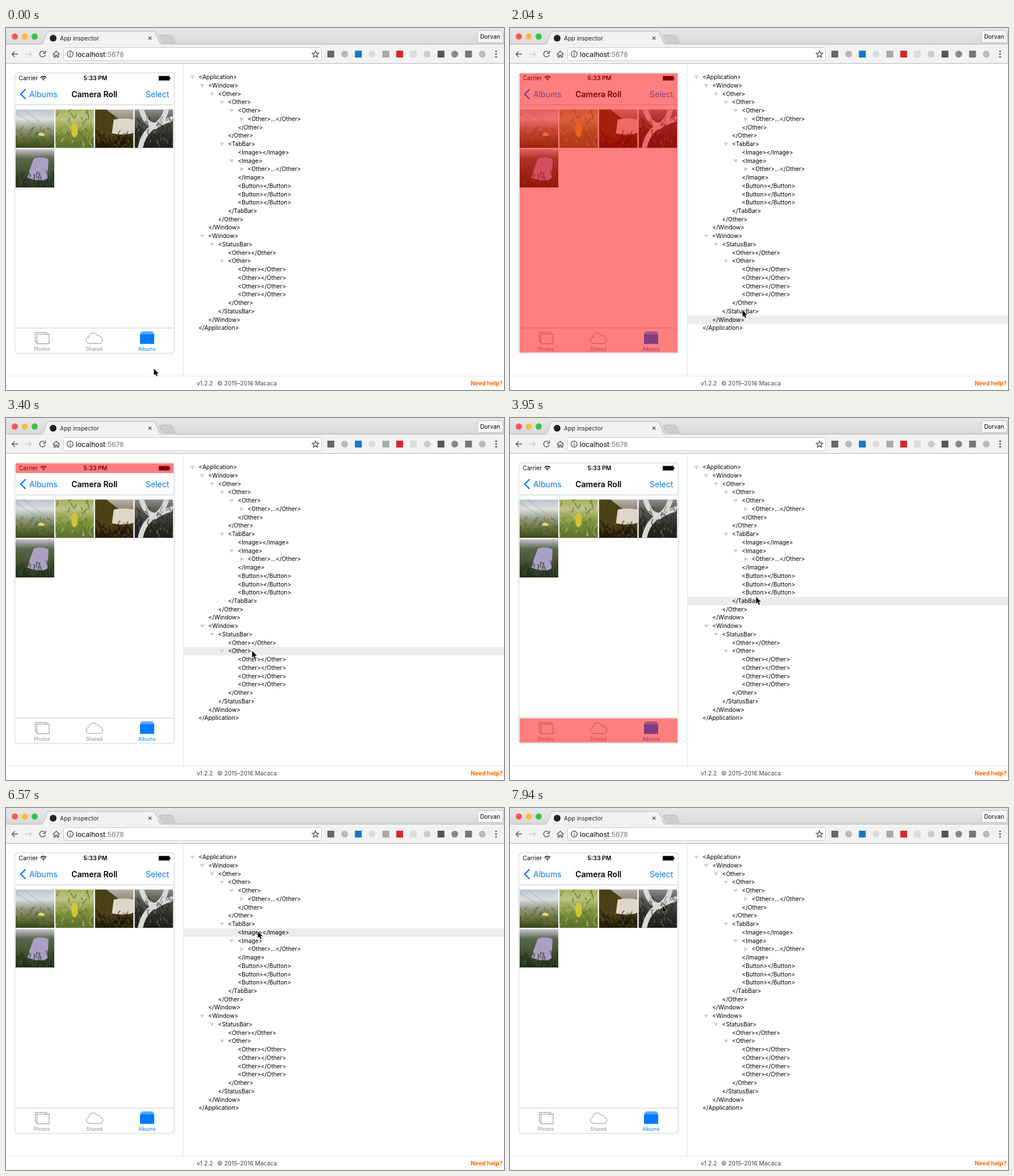
Write an HTML page that moves like this. It is 877 px wide and 638 px high and loops after 8000 ms.

```html
<!DOCTYPE html>
<html lang="en">
<head>
<meta charset="utf-8">
<title>App inspector</title>
<style>
  html, body { margin: 0; width: 877px; height: 638px; overflow: hidden; background: #fff; }
  svg { display: block; font: 10.25px Inter, "Open Sans", sans-serif; }
  .line { fill: none; stroke: #555; stroke-width: 1.4; }
  .thin { fill: none; stroke: #8e8e8e; }
  .blue, .tab.blue { fill: #007aff; }
  .nav { font-size: 14px; }
  .tab { font-size: 8.7px; text-anchor: middle; fill: #8e8e8e; }
</style>
</head>
<body>
<svg width="877" height="638" viewBox="0 0 877 638">
  <linearGradient id="strip" x2="0" y2="1"><stop stop-color="#e8e8e8"/><stop offset="1" stop-color="#d8d8d8"/></linearGradient>

  <!-- browser -->
  <rect width="877" height="29" fill="url(#strip)"/>
  <rect y="28.5" width="877" height="34" fill="#f2f2f2"/>
  <path d="M0 28.5H62Q65 28 66 25L72 9Q73 6 76 6H259Q262 6 263 9L270 25Q271 28 274 28.5H877" fill="#f2f2f2" stroke="#b8b8b8"/>
  <path d="M271 12.5H290Q292 12.5 293 14.5L297.5 26H278Q276 26 275 24L269.5 14Z" fill="#cfcfcf" stroke="#b8b8b8"/>
  <path d="M0 62.5H877" stroke="#b8b8b8"/>
  <circle cx="15.5" cy="15" r="5.5" fill="#fc5753"/>
  <circle cx="33" cy="15" r="5.5" fill="#fdbc40"/>
  <circle cx="50.5" cy="15" r="5.5" fill="#33c748"/>
  <circle cx="83" cy="18" r="6" fill="#222"/>
  <text x="95" y="21.7" font-size="10.4" fill="#222">App inspector</text>
  <path d="M251 15.5l5 5m0-5l-5 5" class="line"/>
  <rect x="830.5" y="4.5" width="45" height="21" rx="3" fill="#f7f7f7" stroke="#c0c0c0"/>
  <text x="852.5" y="18.8" text-anchor="middle">Dorvan</text>
  <g class="line">
    <path d="M21 46H10.5M15.5 41l-5 5l5 5"/>
    <path d="M34 46H45M40 41l5 5l-5 5" stroke="#ccc"/>
    <path d="M68 42.5A5 5 0 1 0 69 47.5M69.5 40v4.5H65"/>
    <path d="M82.5 46.5L88.5 41l6 5.5M84.5 46v5.3H87V48h3v3.3h2.5V46"/>
  </g>
  <rect x="101.5" y="34.5" width="454" height="23" rx="3" fill="#fff" stroke="#c8c8c8"/>
  <g class="line">
    <circle cx="113" cy="46" r="5.2"/>
    <path d="M113 45v4m0-6.5v1.3"/>
    <path d="M545 40.5l1.6 3.8l4.1 .3l-3.1 2.7l1 4l-3.6-2.2l-3.6 2.2l1-4l-3.1-2.7l4.1-.3Z"/>
  </g>
  <text x="123" y="50.5" font-size="12.2">localhost<tspan fill="#777">:5678</tspan></text>
  <g id="extensions"></g>
  <path d="M863 41v11" stroke="#555" stroke-width="3" stroke-linecap="round" stroke-dasharray="0 5"/>

  <!-- page -->
  <path d="M312.5 63V613M0 613.5H877" stroke="#e6e6e6"/>
  <g fill="#444"><text x="336" y="630">v1.2.2</text><text x="372" y="630">© 2015–2016 Macaca</text></g>
  <text x="874.5" y="630" text-anchor="end" font-weight="700" fill="#ff6b0b">Need help?</text>

  <!-- phone -->
  <rect x="15.5" y="79" width="281" height="494.5" rx="6" fill="#fff" stroke="#e9e9e9" stroke-width="2.5"/>
  <text x="22.5" y="92.3">Carrier</text>
  <path d="M60.9 87.2a7.3 7.3 0 0 1 10.2 0M62.8 89.3a4.6 4.6 0 0 1 6.4 0" fill="none" stroke="#000" stroke-width="1.5"/>
  <path d="M64.3 90.8a2.4 2.4 0 0 1 3.4 0L66 92.6Z"/>
  <text x="157.5" y="92.3" text-anchor="middle" font-size="10.4" font-weight="600">5:33 PM</text>
  <path d="M269 84.5h19v2.500h1.500v3h-1.500v2.500h-19Z"/>
  <path d="M34.5 108L26 116.5l8.5 8.5" fill="none" stroke="#007aff" stroke-width="2.3"/>
  <text x="41" y="121.5" class="nav blue">Albums</text>
  <text x="155.7" y="121.5" class="nav" text-anchor="middle" font-weight="600">Camera Roll</text>
  <text x="246" y="121.5" class="nav blue">Select</text>
  <path d="M17 135.5H295M17 528.8H295" stroke="#c8c8c8"/>
  <g id="photos"></g>
  <g class="thin">
    <path d="M71.5 539V536.5h-20v16.500h3"/>
    <rect x="54.5" y="539.5" width="21.5" height="17"/>
    <path d="M147 556H164.500a5.800 5.800 0 0 0 1.800-11.300a5 5 0 0 0-5.800-3a7.600 7.600 0 0 0-14.400 3a5.700 5.700 0 0 0 .900 11.300Z"/>
  </g>
  <path d="M236 539.3h25v17.500h-25ZM237 537h23v1.500h-23ZM238.500 535h20v1.200h-20Z" class="blue"/>
  <text x="63.3" y="569" class="tab">Photos</text>
  <text x="155.3" y="569" class="tab">Shared</text>
  <text x="248.3" y="569" class="tab blue">Albums</text>

  <rect id="area" fill="red" opacity=".5"/>
  <rect id="rowBar" x="313" width="564" height="14.7" fill="#ececec"/>
  <g id="tree"></g>
  <path id="cursor" d="M0 0V11.500L2.600 9.200L4.600 13.500L6.400 12.700L4.600 8.500H8.200Z" stroke="#fff" paint-order="stroke"/>
</svg>
<script>
const $ = id => document.getElementById(id);
const ROW = 14.733, TOP = 79.5, LAG = 80, STEP = 90;

let seed = 7;
const random = (from, to) => {
  seed = seed * 16807 % 2147483647;
  return from + (to - from) * seed / 2147483647;
};

// Toolbar buttons: alternating plain squares and circles
const colours = "#666 #b8b8b8 #1476c6 #ddd #aaa #d8242f #ddd #ccc #555 #888 #777 #bbb".split(" ");
$("extensions").innerHTML = colours.map((fill, i) => {
  const size = 12, x = 572 + i * 24.25 - size / 2;
  return `<rect x="${x}" y="${46 - size / 2}" width="${size}" height="${size}" rx="${i % 2 && i !== 5 ? 6 : 0}" fill="${fill}"/>`;
}).join("");

// Photos: a vertical gradient, one or two shapes and scattered blades
const photos = [
  { tones: "#b9c4d0 #dde0de #949c86 #66733c #36421c", blades: "#7d6c42 #45551f", from: 34,
    shapes: `<path d="M0 6L40 32M14 0L50 28" stroke="#8d989c" stroke-width=".7"/><ellipse cx="46" cy="44" rx="6" ry="3" fill="#e3dd7a"/>` },
  { tones: "#a5b060 #bcc283 #8b9c47 #6f8434 #586e2a", blades: "#4c6a1e #c6cc8e", from: 0,
    shapes: `<ellipse cx="34" cy="36" rx="6" ry="13" fill="#d3c435"/>` },
  { tones: "#b5aeab #988c74 #6b5a30 #33290f #201a0b", blades: "#6b5518 #15110a", from: 44,
    shapes: `<path d="M0 0H20L42 17L28 42H0Z" fill="#4a4216"/><path d="M33 18Q50 14 68 18V41Q52 47 30 42Z" fill="#dfd6ca"/>` },
  { tones: "#8b8f8a #5c5e57 #3c3d36 #292a24 #1f201b", blades: "#161713 #6e716b", from: 18,
    shapes: `<path d="M56 0Q52 20 34 30T10 68M12 0Q20 28 36 28M68 16Q46 22 34 32" fill="none" stroke="#d7d9da" stroke-width="9"/>` },
  { tones: "#cbc5d2 #59664a #4b5a38 #34412a #222d1a", blades: "#485535 #1c2615", from: 46,
    shapes: `<path d="M32 17Q44 12 58 18L56 52Q44 60 20 50Z" fill="#aaa0c5"/>` }
];
$("photos").innerHTML = photos.map(({ tones, blades, from, shapes }, i) => {
  const stops = tones.split(" ").map((tone, k) => `<stop offset="${k / 4}" stop-color="${tone}"/>`).join("");
  const scatter = Array.from({ length: 50 }, (_, k) =>
    `<path d="M${random(0, 68)} ${random(from, 68)}q${random(-3, 3)} -4 ${random(-6, 6)} ${random(-10, -4)}"
      stroke="${blades.split(" ")[k % 2]}"/>`).join("");
  return `<svg x="${17 + i % 4 * 69.8}" y="${143.5 + (i >> 2) * 69.8}" width="68" height="68">
    <linearGradient id="photo${i}" x2="0" y2="1">${stops}</linearGradient>
    <rect width="68" height="68" fill="url(#photo${i})"/>${shapes}
    <g fill="none" stroke-width="2" opacity=".55">${scatter}</g></svg>`;
}).join("");

// Parts of the phone that tree rows light up: x, y, width, height
const tab = i => [17 + i * 92.6, 529.5, 92.6, 42.5];
const bar = (x, width) => [x, 80, width, 17];
const areas = {
  none: [0, 0, 0, 0], screen: [17, 80, 278, 492], tabs: [17, 529.5, 278, 42.5],
  photos: tab(0), shared: tab(1), albums: tab(2),
  status: bar(17, 278), carrier: bar(22, 35), wifi: bar(61, 11), time: bar(136, 43), battery: bar(268, 22)
};

// Tokens: "/X" closes, "X=" is empty, "X+" is collapsed, "X" opens; "@" names an area, else inherited
const tokens = `Application@screen Window Other Other Other Other+ /Other /Other
  TabBar@tabs Image=@none Image Other+ /Image Button=@photos Button=@shared Button=@albums /TabBar /Other /Window
  Window StatusBar@status Other= Other Other=@carrier Other=@wifi Other=@time Other=@battery /Other /StatusBar
  /Window /Application`.split(/\s+/);
const open = [];
const rows = tokens.map((token, i) => {
  const [, name, kind, ownArea] = token.match(/([/\w]+)([=+]?)@?(\w*)/);
  const closing = name[0] === "/";
  const area = closing ? open.pop() : ownArea || open.at(-1);
  const x = 339 + 17.3 * open.length, y = TOP + (i + .5) * ROW;
  let label = `&lt;${name}&gt;`, arrow = "";
  if (kind) label += `${kind === "+" ? "..." : ""}&lt;/${name}&gt;`;
  else if (!closing) {
    open.push(area);
    arrow = `M${x - 15} ${y - 2.8}h8.5l-4.25 6Z`;
  }
  if (kind === "+") arrow = `M${x - 13} ${y - 4.3}l7 4l-7 4Z`;
  return { area, svg: `<path d="${arrow}" fill="#d0d0d0"/><text x="${x}" y="${y + 3.4}">${label}</text>` };
});
$("tree").innerHTML = rows.map(row => row.svg).join("");

// Pointer path: time, x, y; between points it moves in steps of about STEP ms
const path = [
  [0, 260, 600], [1080, 260, 600], [1170, 281, 587], [1720, 400, 512], [1950, 400, 512], [2035, 409, 497],
  [2220, 418, 467], [2610, 425, 448], [3250, 433, 427], [3315, 433, 410], [3865, 433, 322],
  [4360, 435, 281], [5020, 435, 277], [5340, 437, 261], [5695, 438, 255], [6570, 443, 217],
  [6810, 443, 216], [7160, 444, 183], [7670, 443, 183], [7850, 290, 174], [7940, 268, 172], [8000, 268, 172]
];
function pointerAt(time) {
  const next = path.findIndex(point => point[0] > time);
  const [t0, x0, y0] = path[next - 1], [t1, x1, y1] = path[next];
  const count = Math.max(1, Math.round((t1 - t0) / STEP));
  const progress = Math.floor((time - t0) / (t1 - t0) * count) / count;
  return [x0 + (x1 - x0) * progress, y0 + (y1 - y0) * progress];
}

function draw() {
  const time = performance.now() % 8000;
  const [x, y] = pointerAt(time);
  $("cursor").setAttribute("transform", `translate(${Math.round(x) + .5} ${Math.round(y) + .5})`);

  // The highlight trails the pointer
  const [hoverX, hoverY] = pointerAt(Math.max(0, time - LAG));
  const index = Math.floor((hoverY - TOP) / ROW);
  const row = hoverX > 312 ? rows[index] : undefined;
  $("rowBar").setAttribute("y", row ? TOP + index * ROW : -20);
  const box = areas[row ? row.area : "none"];
  ["x", "y", "width", "height"].forEach((key, i) => $("area").setAttribute(key, box[i]));
  requestAnimationFrame(draw);
}
draw();
</script>
</body>
</html>
```
